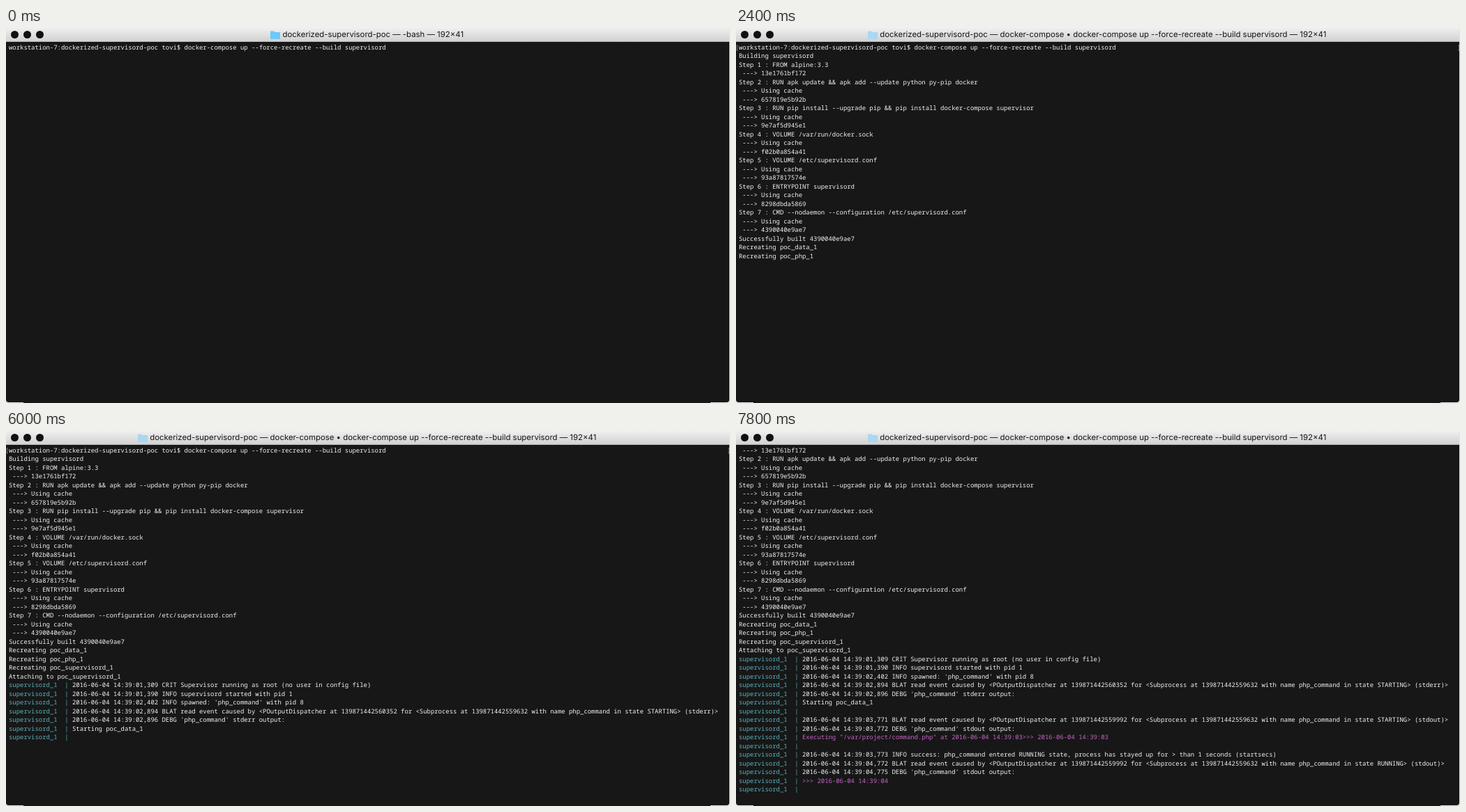
These frames come from a looping animation (1038x539 px, 8000 ms). An HTML page:

```html
<!DOCTYPE html>
<html lang="en">
<head>
<meta charset="utf-8">
<title>Terminal</title>
<style>
  html, body { margin: 0; width: 100%; height: 100%; overflow: hidden; background: #e4e4e4; }
  #window {
    position: absolute; left: 0; top: 0; width: 1037px; height: 538px; overflow: hidden;
    background: #171717; border-radius: 0 0 4px 4px; text-rendering: geometricPrecision;
  }
  #edge { position: absolute; left: 25px; top: 538px; width: 985px; height: 1px; background: #171717; }
  #bar {
    position: absolute; left: 0; top: 0; width: 1038px; height: 19px;
    background: linear-gradient(#efefef, #d2d2d2); border-bottom: 1px solid #b4b4b4;
  }
  #bar i { position: absolute; top: 3.5px; width: 11px; height: 11px; border-radius: 50%; background: #111; }
  #caption {
    position: absolute; left: 0; top: 0; width: 1035px; height: 19px;
    display: flex; align-items: center; justify-content: center; gap: 3.5px;
    font: 11.4px/19px Inter, sans-serif; color: #161616; white-space: pre;
  }
  #caption svg { width: 14px; height: 12px; }
  #screen {
    position: absolute; left: 4px; top: 21.7px; margin: 0; color: #f2f2f2;
    font: 8.94px/12.5px "Noto Sans Mono", monospace;
  }
  #screen div { position: relative; height: 12.5px; white-space: pre; }
  .service { color: #58b4bd; }
  .echo { color: #c763c9; }
  .mark { position: absolute; top: 0; color: #a0a0a0; }
</style>
</head>
<body>
<div id="window">
  <div id="screen"></div>
  <div id="bar">
    <i style="left:7px"></i><i style="left:25px"></i><i style="left:43px"></i>
    <div id="caption">
      <svg viewBox="0 0 14 12"><path id="folder" d="M0 1.5Q0 .5 1 .5H5L6.5 2H13Q14 2 14 3V11Q14 12 13 12H1Q0 12 0 11Z"/></svg>
      <span id="name"></span>
    </div>
  </div>
</div>
<div id="edge"></div>
<script>
const LOOP = 8000, ENTER = 800, RETITLE = 1000, SCROLL = 7400, SCROLLED = 3;
const COLUMN = 5.365, COLUMNS = 192;
const command = 'docker-compose up --force-recreate --build supervisord';
const folder = 'dockerized-supervisord-poc';
const event = (id, state, pipe) =>
  `BLAT read event caused by <POutputDispatcher at ${id} for <Subprocess at 139871442559632 ` +
  `with name php_command in state ${state}> (${pipe})>`;

// Each batch of output appears at once; "| " starts a line from the service.
const batches = [
  [0, `workstation-7:${folder} tovi$ ${command}`],
  [1400, 'Building supervisord'],
  [1800, `Step 1 : FROM alpine:3.3
 ---> 13e1761bf172
Step 2 : RUN apk update && apk add --update python py-pip docker
 ---> Using cache
 ---> 657819e5b92b
Step 3 : RUN pip install --upgrade pip && pip install docker-compose supervisor
 ---> Using cache
 ---> 9e7af5d945e1
Step 4 : VOLUME /var/run/docker.sock
 ---> Using cache
 ---> f02b0a854a41
Step 5 : VOLUME /etc/supervisord.conf
 ---> Using cache
 ---> 93a87817574e
Step 6 : ENTRYPOINT supervisord
 ---> Using cache
 ---> 8298dbda5869
Step 7 : CMD --nodaemon --configuration /etc/supervisord.conf
 ---> Using cache
 ---> 4390040e9ae7
Successfully built 4390040e9ae7
Recreating poc_data_1`],
  [2400, 'Recreating poc_php_1'],
  [2800, 'Recreating poc_supervisord_1'],
  [3600, 'Attaching to poc_supervisord_1'],
  [3800, `| 2016-06-04 14:39:01,309 CRIT Supervisor running as root (no user in config file)
| 2016-06-04 14:39:01,390 INFO supervisord started with pid 1`],
  [4800, "| 2016-06-04 14:39:02,402 INFO spawned: 'php_command' with pid 8"],
  [5600, `| 2016-06-04 14:39:02,894 ${event('139871442560352', 'STARTING', 'stderr')}
| 2016-06-04 14:39:02,896 DEBG 'php_command' stderr output:
| Starting poc_data_1
| `],
  [6400, `| 2016-06-04 14:39:03,771 ${event('139871442559992', 'STARTING', 'stdout')}
| 2016-06-04 14:39:03,772 DEBG 'php_command' stdout output:
| Executing "/var/project/command.php" at 2016-06-04 14:39:03>>> 2016-06-04 14:39:03
| 
| 2016-06-04 14:39:03,773 INFO success: php_command entered RUNNING state, process has stayed up for > than 1 seconds (startsecs)`],
  [7400, `| 2016-06-04 14:39:04,772 ${event('139871442559992', 'RUNNING', 'stdout')}
| 2016-06-04 14:39:04,775 DEBG 'php_command' stdout output:
| >>> 2016-06-04 14:39:04
| `],
];

const $ = id => document.getElementById(id);

function add(parent, tag, text, className = '') {
  const el = parent.appendChild(document.createElement(tag));
  el.textContent = text;
  el.className = className;
  return el;
}

const rows = batches.flatMap(([time, block]) => block.split('\n').map(text => {
  const el = add($('screen'), 'div', '');
  if (text.startsWith('| ')) {
    const message = text.slice(2);
    add(el, 'span', 'supervisord_1  | ', 'service');
    add(el, 'span', message, /^(Executing|>>>)/.test(message) ? 'echo' : '');
  } else {
    add(el, 'span', text);
  }
  return { time, el };
}));

const marks = [['[', -1], [']', COLUMNS]].map(([text, column]) => {
  const mark = add(rows[0].el, 'span', text, 'mark');
  mark.style.left = column * COLUMN + 'px';
  return mark;
});

function draw(now) {
  const t = now % LOOP;
  const running = t >= RETITLE;
  const title = `${folder} — ${running ? `docker-compose • ${command}` : '-bash'} — 192×41`;
  if ($('name').textContent !== title) $('name').textContent = title;
  $('folder').style.fill = running ? '#a9d8f2' : '#6cc9f8';
  for (const mark of marks) mark.hidden = t < ENTER;
  rows.forEach(({ time, el }, i) => {
    const gone = t >= SCROLL && i < SCROLLED;
    el.style.display = t >= time && !gone ? '' : 'none';
  });
  requestAnimationFrame(draw);
}
draw(performance.now());
</script>
</body>
</html>
```
